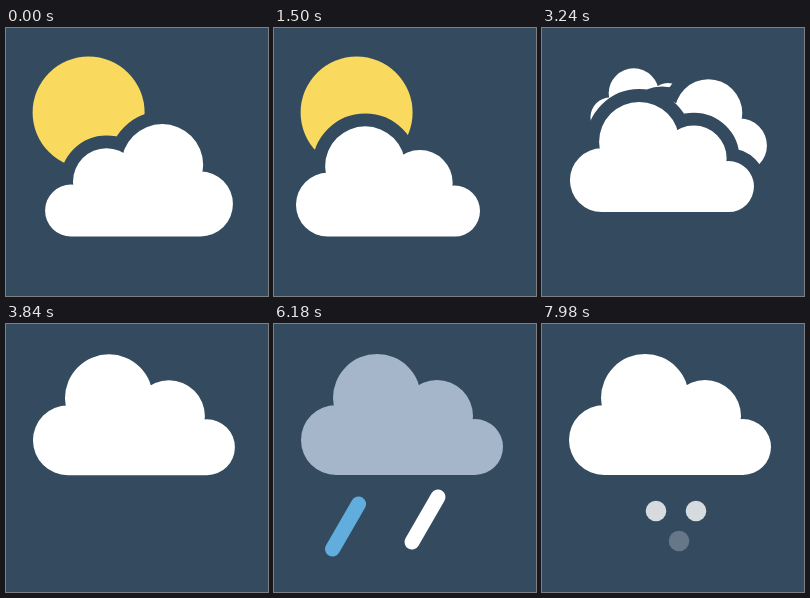
An HTML page for the animation above (8 s loop, 262 by 268 pixels).

```html
<!DOCTYPE html>
<html lang="en">
<head>
<meta charset="utf-8">
<title>Weather icons</title>
<style>
  html, body { margin: 0; width: 100%; height: 100%; overflow: hidden; background: #334a5f; }
  svg { display: block; width: 100%; height: 100%; }
  .cloud { fill: #fff; stroke: #334a5f; paint-order: stroke; }
  .bar { stroke: #61aede; stroke-width: 15; stroke-linecap: round; }
</style>
</head>
<body>
<svg id="stage" viewBox="0 0 262 268"></svg>
<script>
const LOOP = 8000, STEP = 30, GAP = 12.8;
const WHITE = [255, 255, 255], GREY = [166, 182, 202], BLUE = [97, 174, 222];
const stage = document.getElementById('stage');

function add(tag, attrs) {
  const el = document.createElementNS('http://www.w3.org/2000/svg', tag);
  for (const k in attrs) el.setAttribute(k, attrs[k]);
  stage.append(el);
  return el;
}

// Cloud shape around its bottom centre, as overlapping discs on a flat base
const disc = ([x, y, r]) =>
  `M${x - r} ${y}a${r} ${r} 0 1 1 ${2 * r} 0a${r} ${r} 0 1 1 ${-2 * r} 0z`;
const CLOUD = [[-66, -35, 35], [-25, -77, 44], [35, -59, 36], [73, -28, 28]]
  .map(disc).join('') + 'M-66 -52H73V0H-66z';
const cloud = () => add('path', { class: 'cloud', d: CLOUD });
const bar = () => add('line', { class: 'bar', x1: 13, y1: -22.5, x2: -13, y2: 22.5 });
const flake = (cx, cy) => add('circle', { cx, cy, r: 10.3, fill: '#fff' });

// Created from back to front
const sun = add('circle', { r: 56, fill: '#fada5e' });
const far = cloud(), back = cloud(), first = cloud();
const bolt = add('path', { d: 'M-3 0H18L7 22H24L-20 69L-9 35H-24z', fill: '#fada5e' });
const barL = bar(), barR = bar();
const flakes = [flake(114, 187), flake(154, 187), flake(137, 217)];
const front = cloud();

// Easing
const linear = u => u;
const smooth = u => u * u * (3 - 2 * u);
const spring = u => u <= 0 ? 0 : u >= 1 ? 1 : 1 - Math.exp(-5 * u) * Math.cos(5.5 * u);
const windUp = u => u * u * (3.5 * u - 2.5);

const lerp = (a, b, u) => a + (b - a) * u;
const blend = (a, b, u) => `rgb(${a.map((v, i) => Math.round(lerp(v, b[i], u)))})`;

function place(el, x, y, s = 1, opacity = 1, flip = 1) {
  const shown = s > .001 && opacity > .001;
  el.setAttribute('visibility', shown ? 'visible' : 'hidden');
  if (!shown) return;
  el.setAttribute('transform', `translate(${x} ${y}) scale(${s * flip} ${s})`);
  el.setAttribute('opacity', opacity);
  if (el.matches('.cloud')) el.setAttribute('stroke-width', 2 * GAP / s);
}

function draw(t) {
  const ramp = (from, to, ease = smooth) =>
    ease(Math.min(1, Math.max(0, (t - from) / (to - from))));

  // Sun and the first cloud make way
  place(sun, 82.6, 84.5, 1 - ramp(2280, 2520, windUp));
  const leave = ramp(600, 800, linear);
  place(first, 133 - 32 * leave, 208.6, .93, 1 - leave, -1);

  // Clouds behind gather, then hide under the front one
  const appear = ramp(1500, 1830), gather = ramp(3120, 3390);
  place(back, lerp(128, 153, appear) - 14 * gather, 140.7 + 9 * gather, .77, appear, -1);
  place(far, 101 + 12 * gather, 98 + 27 * gather, .57 * ramp(2430, 2850, spring));

  // Front cloud springs in, then rises to the centre
  const enter = ramp(630, 1230, spring), rise = ramp(3180, 3870, spring);
  const grow = ramp(3240, 3870, spring);
  place(front, -78 + 192 * enter + 14 * rise, lerp(208.6, 151, rise),
    .546 + .365 * enter + .089 * grow);
  front.style.fill = blend(WHITE, GREY, ramp(4380, 4560) - ramp(7440, 7680));

  const drop = ramp(5130, 5310);
  place(bolt, 120, 163 + 37 * drop, ramp(4380, 4830, spring), 1 - drop);

  // Bars slide along their own slant
  const slide = (el, x, y, start, end, sink) => {
    const enter = ramp(start, start + 420, spring), exit = ramp(end, end + 330);
    const d = 12 * (enter - 1) + sink + 12 * exit;
    place(el, x - d, y + 1.73 * d, 1, Math.min(1, enter) * (1 - exit));
  };
  slide(barL, 75, 196.5, 5340, 6630, 16 * ramp(6090, 6390));
  slide(barR, 151, 195.5, 5400, 6750, 0);
  barR.style.stroke = blend(BLUE, WHITE, ramp(5940, 6120));

  flakes.forEach((f, i) =>
    f.setAttribute('opacity', i < 2 ? .8 * ramp(7680, 7980) : .25 * ramp(7860, 7980)));
}

let start;
function tick(now) {
  start ??= now;
  const t = (now - start) % LOOP;
  draw(Math.floor(t / STEP) * STEP);
  requestAnimationFrame(tick);
}
draw(0);
requestAnimationFrame(tick);
</script>
</body>
</html>
```
